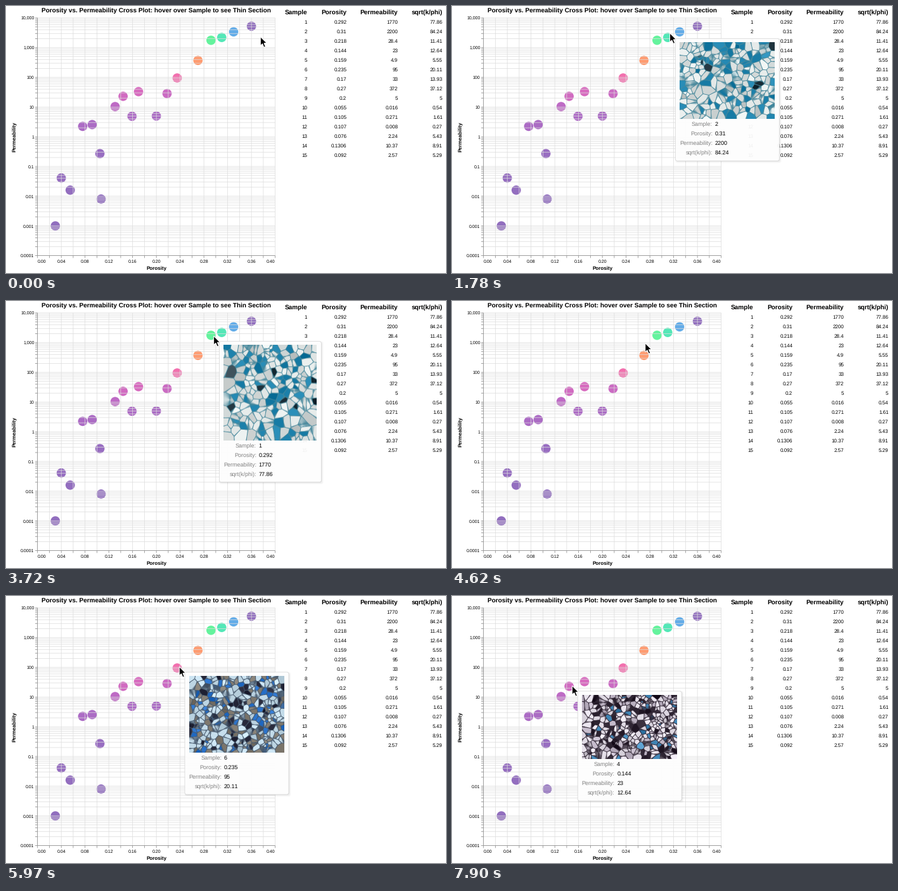
A matplotlib script that plays this animation: 694 by 421 pixels, repeating every 8 s.

```python
import numpy as np
import matplotlib.pyplot as plt
from matplotlib.animation import FuncAnimation
from matplotlib.collections import LineCollection
from matplotlib.colors import to_rgb
from matplotlib.patches import Circle, FancyBboxPatch, Polygon

W, H, DPI = 694, 421, 100
STEP, LOOP = 50, 8000
PX = 72 / DPI

plt.rcParams.update({
    "font.family": "Liberation Sans",
    "text.hinting": "none",
    "text.hinting_factor": 1,
    "toolbar": "None",
})

# porosity, permeability of samples 1, 2, 3, ...
SAMPLES = [
    (0.292, 1770), (0.31, 2200), (0.218, 28.4), (0.144, 23), (0.159, 4.9),
    (0.235, 95), (0.17, 33), (0.27, 372), (0.2, 5), (0.055, 0.016),
    (0.105, 0.271), (0.107, 0.008), (0.076, 2.24), (0.1306, 10.37),
    (0.092, 2.57), (0.36, 5250), (0.33, 3400), (0.04, 0.041), (0.03, 0.001),
]
TABLE_ROWS = 15
RADIUS = 7.35

# cursor strokes: start time, jumps, end x, end y, ease-out power
START = (400.5, 47.5)
JUMP = 147
STROKES = [
    (140, 3, 388, 33, 2), (1190, 6, 341.5, 42, 2), (2220, 1, 353.5, 43, 1),
    (2820, 4, 341.5, 51.5, 1), (3570, 3, 325, 54.5, 2), (4320, 3, 304, 65.5, 2),
    (4770, 3, 301, 80, 2), (5520, 4, 272.5, 110.5, 1), (6120, 2, 270.5, 111, 1),
    (6410, 2, 262, 127, 1), (6710, 1, 255.5, 132, 1), (6860, 3, 222, 134.5, 1),
    (7300, 2, 206, 132.5, 1), (7750, 2, 188.7, 140.5, 1),
]

X0, X1, Y0, Y1 = 49.7, 424.6, 18.8, 393.6


def to_x(phi):
    return X0 + (X1 - X0) * phi / 0.4


def to_y(k):
    return Y0 + (Y1 - Y0) * (4 - np.log10(k)) / 8


def flow_index(phi, k):
    return round((k / phi) ** 0.5, 2)


def cursor_at(now):
    pos = np.array(START)
    for t, n, x, y, power in STROKES:
        if now < t:
            break
        done = min(n, int((now - t) // JUMP) + 1)
        pos = pos + (np.array((x, y)) - pos) * (1 - (1 - done / n) ** power)
    return pos


def hovered(x, y):
    """Number of the sample under the cursor's hot spot, or 0."""
    for i, (phi, k) in enumerate(SAMPLES, 1):
        if np.hypot(x + 1.5 - to_x(phi), y + 2 - to_y(k)) < RADIUS:
            return i
    return 0


def rainbow(t):
    """Cyclic cubehelix rainbow."""
    d = abs(t - 0.5)
    sat, light = 1.5 - 1.5 * d, 0.8 - 0.9 * d
    a = sat * light * (1 - light)
    ang = np.radians(360 * t + 20)
    c, s = np.cos(ang), np.sin(ang)
    rgb = (light + a * (-0.14861 * c + 1.78277 * s),
           light + a * (-0.29227 * c - 0.90649 * s),
           light + a * 1.97294 * c)
    return np.clip(rgb, 0, 1)


# grain tones, the last one for the seams, and the share of each grain tone
PALE = ["#e2e7e6", "#cdd4d4", "#1c80aa", "#192d37", "#46879b"], [.56, .2, .2, .04]
BLUE = ["#c0d8e6", "#807a70", "#2870c8", "#242638", "#46586c"], [.5, .22, .17, .11]
DARK = ["#e4dee8", "#beb4c4", "#281e2c", "#3e82b2", "#302634"], [.58, .16, .18, .08]


def grains(seed, kind, size, w=150, h=121):
    """Flat mineral grains in a few tones, split by soft seams."""
    rng = np.random.default_rng(seed)
    *tones, seam = [np.array(to_rgb(c)) for c in kind[0]]
    n = int(w * h / size ** 2)
    px, py = rng.uniform(0, w, n), rng.uniform(0, h, n)
    yy, xx = np.mgrid[0:h, 0:w] + 0.5
    dist = np.hypot(xx[..., None] - px, yy[..., None] - py)
    near = dist.argmin(-1)
    two = np.partition(dist, 1, axis=-1)
    cell = np.array(tones)[rng.choice(len(tones), n, p=kind[1])]
    cell = cell + rng.normal(0, 0.04, (n, 1))
    mix = np.clip((two[..., 1] - two[..., 0]) / 1.8, 0, 1)[..., None]
    return np.clip(cell[near] * mix + seam * (1 - mix), 0, 1)


PHOTOS = {
    1: grains(1, PALE, 10, w=147, h=150),
    2: grains(2, PALE, 9),
    3: grains(3, BLUE, 7),
    4: grains(4, DARK, 6.5, h=101),
    6: grains(6, BLUE, 7),
    7: grains(7, DARK, 7),
    8: grains(8, PALE, 8),
    16: grains(16, PALE, 10, h=137),
    17: grains(17, PALE, 10, h=125),
}

fig = plt.figure(figsize=(W / DPI, H / DPI), dpi=DPI, facecolor="white")
ax = fig.add_axes([0, 0, 1, 1])
ax.axis("off")


def label(x, y, text, size, ha="right", **kw):
    """Text whose capitals are centred on y."""
    return ax.text(x, y + 0.36 * size, text, fontsize=size * PX, ha=ha, va="baseline", **kw)


def lines(segs, color):
    ax.add_collection(LineCollection(segs, colors=color, linewidths=0.75 * PX, snap=False))


def draw_chart():
    ks = [m * 10.0 ** e for e in range(-4, 4) for m in range(1, 10)] + [1e4]
    xs = [to_x(0.02 * i) for i in range(21)]
    ys = [to_y(k) for k in ks]
    lines([[(x, Y0), (x, Y1)] for x in xs] + [[(X0, y), (X1, y)] for y in ys], "#dddddd")
    lines([[(x, Y1), (x, Y1 + 3.75)] for x in xs] + [[(X0 - 3.75, y), (X0, y)] for y in ys], "#888888")
    lines([[(X0, Y0), (X0, Y1)], [(X0, Y1), (X1, Y1)]], "#888888")

    for e in range(-4, 5):
        label(X0 - 5.2, to_y(10.0 ** e), f"{10.0 ** e:,g}", 7.5)
    for i in range(11):
        ha = "left" if i == 0 else "right" if i == 10 else "center"
        label(to_x(0.04 * i), 402.7, f"{0.04 * i:.2f}", 7.5, ha)

    mid = (X0 + X1) / 2
    label(mid, 6, "Porosity vs. Permeability Cross Plot: hover over Sample to see Thin Section",
          9.75, "center", weight="bold")
    label(mid, 413.3, "Porosity", 8.25, "center", weight="bold")
    ax.text(17.6, (Y0 + Y1) / 2, "Permeability", fontsize=8.25 * PX, weight="bold",
            rotation=90, ha="right", va="center")

    top = max(flow_index(*s) for s in SAMPLES)
    for phi, k in SAMPLES:
        color = rainbow(flow_index(phi, k) / top)
        ax.add_patch(Circle((to_x(phi), to_y(k)), RADIUS, fc=color, ec="none", alpha=0.76))


def draw_table():
    rights = (475, 537.3, 618.3, 688.6)
    for x, head in zip(rights, ("Sample", "Porosity", "Permeability", "sqrt(k/phi)")):
        label(x, 9.3, head, 9.75, weight="bold")
    for i, (phi, k) in enumerate(SAMPLES[:TABLE_ROWS]):
        cells = (i + 1, phi, k, flow_index(phi, k))
        for x, v in zip(rights, cells):
            label(x, 25.2 + 15 * i, f"{v:g}", 8.25)


class Tooltip:
    KEYS = ("Sample:", "Porosity:", "Permeability:", "sqrt(k/phi):")
    SIZE = 8.9

    def __init__(self):
        self.shadows = [self.box(pad, fc="black", ec="none", alpha=0.03, zorder=5)
                        for pad in (-0.8, 0.4, 1.6)]
        self.panel = self.box(0, fc=(1, 1, 1, 0.95), ec="#d4d4d4", lw=0.75 * PX, zorder=6)
        self.photo = ax.imshow(PHOTOS[2], aspect="auto", interpolation="bilinear", zorder=7)
        self.keys = [label(0, 0, k, self.SIZE, color="#808080", zorder=7) for k in self.KEYS]
        self.vals = [label(0, 0, "", self.SIZE, "left", zorder=7) for _ in self.KEYS]
        self.parts = [*self.shadows, self.panel, self.photo, *self.keys, *self.vals]

    @staticmethod
    def box(pad, **kw):
        style = f"round,pad={pad},rounding_size=3"
        return ax.add_patch(FancyBboxPatch((0, 0), 1, 1, boxstyle=style, **kw))

    def show(self, x, y, sample):
        for part in self.parts:
            part.set_visible(sample in PHOTOS)
        if sample not in PHOTOS:
            return
        img = PHOTOS[sample]
        h, w = img.shape[:2]
        self.panel.set_bounds(x, y, w + 14, h + 72)
        for s in self.shadows:
            s.set_bounds(x + 1.5, y + 1.5, w + 14, h + 72)
        self.photo.set_data(img)
        self.photo.set_extent((x + 7, x + 7 + w, y + 6 + h, y + 6))
        phi, k = SAMPLES[sample - 1]
        values = (sample, phi, k, flow_index(phi, k))
        for i, (key, val, v) in enumerate(zip(self.keys, self.vals, values)):
            base = y + h + 13.8 + 15 * i + 0.36 * self.SIZE
            key.set_position((x + 58.5, base))
            val.set_position((x + 62, base))
            val.set_text(f"{v:g}")


draw_chart()
draw_table()
tooltip = Tooltip()
ARROW = np.array([(0, 0), (0, 14), (3.2, 11.1), (5.6, 16.6), (8, 15.6), (5.7, 10.2), (10, 10)])
cursor = ax.add_patch(Polygon(ARROW, fc="black", ec="white", lw=PX, joinstyle="miter", zorder=9))
ax.set_xlim(0, W)
ax.set_ylim(H, 0)


def update(i):
    x, y = cursor_at(i * STEP + STEP - 1)
    cursor.set_xy(ARROW + (x + 0.8, y + 1))
    tooltip.show(x + 9.5, y + 9.5, hovered(x, y))
    return [cursor, *tooltip.parts]


anim = FuncAnimation(fig, update, frames=LOOP // STEP, interval=STEP,
                     repeat=True, repeat_delay=0, blit=False)
plt.show()
```
